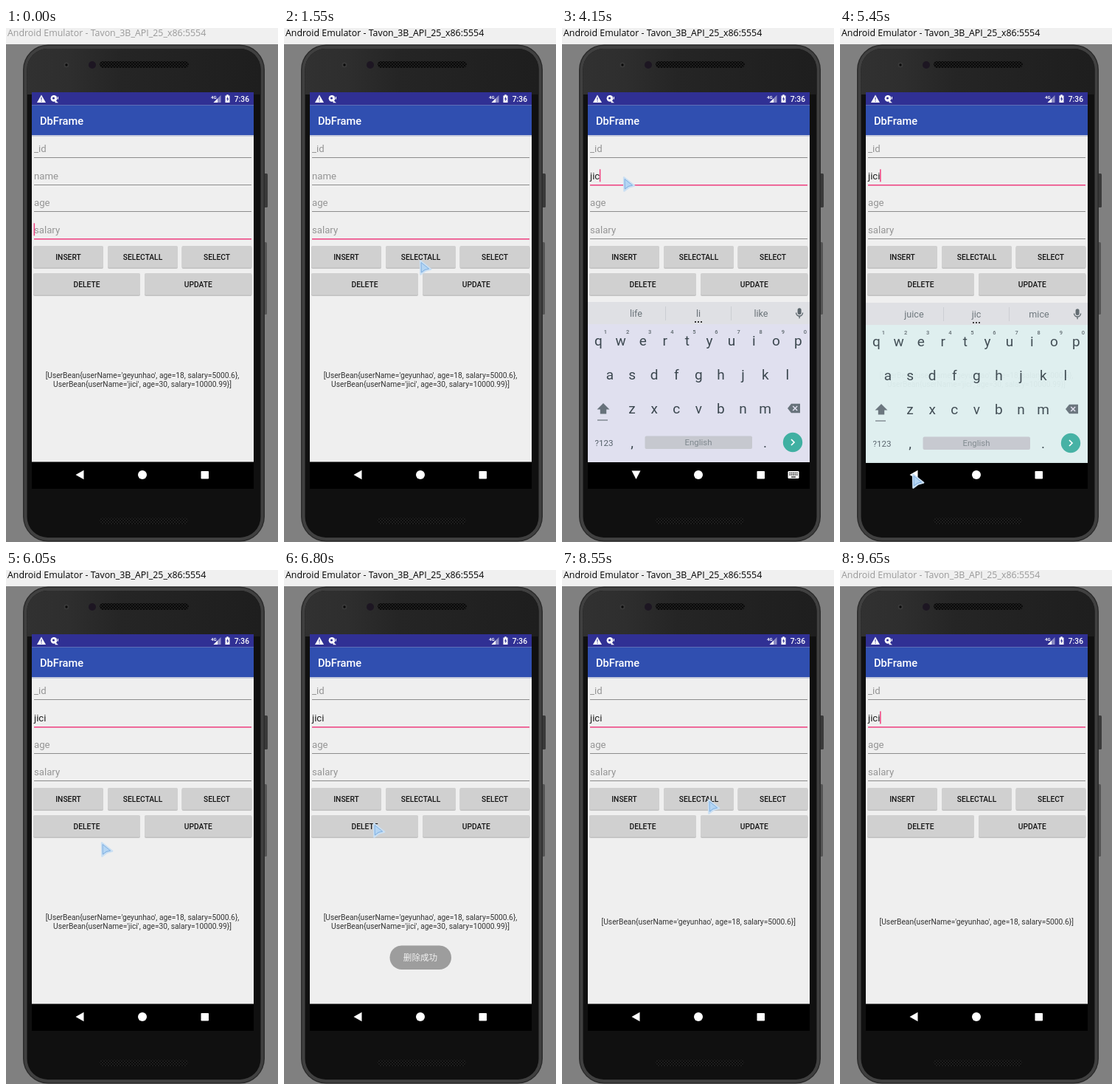
Write an HTML page that moves like this. It is 369 by 696 pixels and loops after 10 s.

```html
<!DOCTYPE html>
<html lang="en">
<head>
<meta charset="utf-8">
<title>Database demo</title>
<style>
html, body { margin: 0; width: 100%; height: 100%; overflow: hidden; background: #808080; }
svg { display: block; width: 369px; height: 696px; font-family: Roboto, sans-serif; }
.mid { text-anchor: middle; }
.cap { font-size: 10.25px; font-weight: 500; fill: #151515; text-anchor: middle; }
.field { font-size: 13.2px; }
.out { font-size: 10.25px; fill: #333; text-anchor: middle; }
.key { font-size: 19px; fill: #3b474f; text-anchor: middle; }
.hint { font-size: 7.5px; font-weight: 500; fill: #5c666c; text-anchor: middle; }
.word { font-size: 12.6px; fill: #6a7379; text-anchor: middle; }
</style>
</head>
<body>
<svg id="stage" viewBox="0 0 369 696" xmlns="http://www.w3.org/2000/svg">
  <defs>
    <pattern id="mesh" width="4" height="4" patternUnits="userSpaceOnUse">
      <rect width="4" height="4" fill="#0a0a0a"/>
      <circle cx="1" cy="1" r=".8" fill="#343434"/><circle cx="3" cy="3" r=".8" fill="#343434"/>
    </pattern>
    <linearGradient id="glare" x2="1" y2="0">
      <stop offset="0" stop-color="#313131"/><stop offset=".18" stop-color="#2e2e2e"/>
      <stop offset=".4" stop-color="#252525"/><stop offset="1" stop-color="#1e1e1e"/>
    </linearGradient>
    <clipPath id="screen"><rect x="35" y="87" width="301" height="537"/></clipPath>
  </defs>

  <rect width="369" height="696" fill="#808080"/>
  <rect width="369" height="22" fill="#f0f0f0"/>
  <text id="caption" x="2" y="11" font-size="12.4" font-family="Open Sans, sans-serif">Android Emulator - Tavon_3B_API_25_x86:5554</text>

  <g id="phone">
    <rect x="349" y="197" width="6" height="46" rx="1.5" fill="#3a3a3a"/>
    <rect x="349" y="290" width="5" height="98" rx="1.5" fill="#555"/>
    <rect x="23" y="22.5" width="328" height="673" rx="34" fill="#2b2b2b"/>
    <rect x="24.5" y="24" width="325" height="670" rx="32.5" fill="#404040"/>
    <rect x="28.5" y="28" width="317" height="662" rx="28" fill="#101010"/>
    <path d="M28.5 90V56a28 28 0 0 1 28-28h261a28 28 0 0 1 28 28v34z" fill="url(#glare)"/>
    <circle cx="82" cy="50" r="3.5" fill="#3a3a3a"/><circle cx="82" cy="50" r="1.7" fill="#0a0a0a"/>
    <circle cx="117" cy="50" r="5" fill="#1d1622"/>
    <rect x="127" y="45" width="121" height="9" rx="4.5" fill="url(#mesh)"/>
    <rect x="127" y="663" width="120" height="9" rx="4.5" fill="url(#mesh)"/>
  </g>

  <rect x="35" y="87" width="301" height="501" fill="#efefef"/>
  <rect x="35" y="145" width="301" height="2" fill="#c6cbdc"/>
  <rect x="35" y="87" width="301" height="17.5" fill="#303094"/>
  <rect x="35" y="104.5" width="301" height="40.5" fill="#304fb0"/>
  <g id="status" fill="#fff">
    <path d="M48 90.5l6 10.5h-12z"/><path d="M47.5 94h1v3.5h-1zM47.5 98.5h1v1.2h-1z" fill="#303094"/>
    <circle cx="65" cy="95.3" r="4.4"/><path d="M67 98l4 3.2h-4.5zM70 93h1v3.5H70z"/>
    <circle cx="64.5" cy="95" r="1.6" fill="#303094"/>
    <text x="278" y="95.5" font-size="6" font-weight="700">4G</text>
    <path d="M291.5 91v10h-10z" opacity=".45"/><path d="M287 95.5v5.5h-5.5z"/>
    <path d="M297.5 91.5h1.8v-1.2h2.4v1.2h1.8v9.5h-6z"/>
    <path d="M301 92.8l-2 3.6h1.3v3l2-3.8h-1.3z" fill="#303094"/>
    <text x="330" y="99.7" font-size="10.25" font-weight="500" text-anchor="end">7:36</text>
  </g>
  <text x="46" y="130.7" font-size="14.65" font-weight="500" fill="#fff">DbFrame</text>

  <g id="form"></g>
  <rect id="caret" width="1.5" height="17" fill="#f0407f"/>
  <g id="result"></g>
  <rect x="35" y="587.5" width="301" height="36.5"/>
  <g clip-path="url(#screen)"><g id="board"></g></g>

  <g fill="#fff">
    <path id="back"/>
    <circle cx="185" cy="605" r="6"/>
    <rect x="264.5" y="600" width="10.5" height="10.5" rx=".8"/>
    <g id="ime">
      <rect x="306.5" y="600" width="15" height="10" rx="1.2"/>
      <path d="M308.5 602.5h11M308.5 605h11" stroke="#000" stroke-width="1.3" stroke-dasharray="1.4 1"/>
      <path d="M311 608h6" stroke="#000" stroke-width="1.2"/>
    </g>
  </g>

  <g id="toast">
    <rect x="143.5" y="508.5" width="83.5" height="32.5" rx="16.2" fill="#616161"/>
    <text class="mid" x="185" y="529" font-size="11.6" fill="#f2f2f2" font-family="Noto Sans CJK SC, Noto Sans CJK, sans-serif">删除成功</text>
  </g>

  <g id="mouse" stroke-linejoin="round">
    <path d="M2 1.5L16.2 12.6L9 14.6L2.4 19.6Z" fill="#93bfea" stroke="#c9dff3" stroke-width="2.4"/>
    <path d="M3 3.5L13.6 12L8 13.4L3.3 17Z" fill="#b4d5f3" stroke="#80b0e2"/>
  </g>
</svg>

<script>
const LOOP = 10000, STEP = 50;
const NAME = "jici";
const $ = id => document.getElementById(id);
const within = (t, a, b) => t >= a && t < b;
const ramp = (t, a, b) => Math.min(1, Math.max(0, (t - a) / (b - a)));
const show = (el, on) => el.setAttribute("visibility", on ? "visible" : "hidden");
const text = (x, y, s, attrs) => `<text x="${x}" y="${y}" ${attrs}>${s}</text>`;

// Form
const rows = ["_id", "name", "age", "salary"];
const buttons = [
  ["INSERT", 37, 295, 95], ["SELECTALL", 138, 295, 95], ["SELECT", 238.5, 295, 95],
  ["DELETE", 37, 332, 145], ["UPDATE", 188, 332, 145.5]
];
$("form").innerHTML = rows.map((label, i) =>
  text(38, 168 + 36.6 * i, label, `id="${label}" class="field" fill="#959595"`) +
  `<rect id="line${i}" x="38" y="${Math.round(175.2 + 36.6 * i)}" width="295"/>`
).join("") + buttons.map(([label, x, y, w]) =>
  `<rect x="${x}" y="${y + 1}" width="${w}" height="30" rx="2" fill="#c2c2c2"/>
   <rect x="${x}" y="${y}" width="${w}" height="29.5" rx="1.8" fill="#d0d0d0"/>
   <rect id="press${label}" x="${x}" y="${y}" width="${w}" height="29.5" rx="1.8" fill="#000" opacity="0"/>` +
  text(x + w / 2, y + 19, label, 'class="cap"')
).join("");

// Query output
const bean = (name, age, salary) => `UserBean{userName='${name}', age=${age}, salary=${salary}}`;
const first = bean("geyunhao", 18, "5000.6");
$("result").innerHTML =
  "<g id='both'>" + text(185, 474, "[" + first + ",", 'class="out"') +
  text(185, 486.3, bean(NAME, 30, "10000.99") + "]", 'class="out"') + "</g>" +
  "<g id='one'>" + text(185.3, 480, "[" + first + "]", 'class="out"') + "</g>";

// Keyboard
const keys = (letters, x, y) => [...letters].map((c, i) => text(x + 30.1 * i, y, c, 'class="key"')).join("");
const digits = [..."1234567890"].map((c, i) => text(59 + 30.1 * i, 413.5, c, 'class="hint"')).join("");
$("board").innerHTML = `
  <rect x="35" y="371" width="301" height="217" fill="#e0e0ef"/>
  <rect id="tint" x="35" y="401" width="301" height="187" fill="#dff0f0"/>
  <rect x="35" y="371" width="301" height="30" fill="#dfe0e4"/>
  <path d="M140.5 377v19M229.5 377v19" stroke="#cbcdd2"/>
  <g id="words">${[100.5, 185, 270].map((x, i) => text(x, 391.3, "", `id="word${i}" class="word"`)).join("")}
    <path d="M180 398h2M184 398h2M188 398h2" stroke="#333" stroke-width="2"/></g>
  <g fill="none" stroke="#5c666c" stroke-width="1.4">
    <rect x="320.3" y="380" width="3.6" height="7.4" rx="1.8" fill="#5c666c"/>
    <path d="M317.6 385.5a4.5 4.5 0 0 0 9 0M322.1 390v3.2"/>
  </g>
  ${digits}${keys("qwertyuiop", 49.5, 430)}${keys("asdfghjkl", 65, 475.5)}${keys("zxcvbnm", 95, 521.5)}
  <path d="M56 508l8.5 8.5h-4.3v6h-8.4v-6h-4.3z" fill="#67727b"/>
  <path d="M48 531h14" stroke="#7b858c" stroke-width="1.4"/>
  <path d="M306 515l5-6.3h12v12.6h-12z" fill="#67727b"/>
  <path d="M313.2 512l6 6M319.2 512l-6 6" stroke="#e0e0ef" stroke-width="1.5"/>
  ${text(57, 565.5, "?123", 'class="mid" font-size="11.6" fill="#56616a"')}
  ${text(95, 568, ",", 'class="key"')}${text(275.5, 568, ".", 'class="key"')}
  <rect x="112.5" y="552.5" width="145.5" height="17.5" rx="2" fill="#c6c8cf"/>
  ${text(185, 565.3, "English", 'class="mid" font-size="11.4" fill="#7f888e"')}
  <circle cx="313" cy="561" r="13.2" fill="#40b0a2"/>
  <path d="M311 557l4 4l-4 4" fill="none" stroke="#fff" stroke-width="1.7"/>`;

// Pointer stops: time, x, y
const stops = [
  [50, 15, 376], [200, 15, 376], [700, 183, 314], [1550, 183, 314], [1650, 189, 309],
  [1800, 189, 309], [2250, 82, 201], [4700, 82, 201], [5300, 97, 603], [5500, 97, 603],
  [5750, 122, 413], [6050, 128, 368], [6350, 120, 342], [6900, 120, 342], [7650, 197, 310],
  [8800, 197, 310], [9250, 18, 300]
];
function pointerAt(t) {
  let i = 0;
  while (i < stops.length - 2 && t >= stops[i + 1][0]) i++;
  const [a, x, y] = stops[i], [b, u, v] = stops[i + 1];
  const p = ramp(t, a, b), e = p * p * (3 - 2 * p);
  return [x + (u - x) * e, y + (v - y) * e];
}

const typedAt = [3700, 3950, 4150, 4300];
const caretOff = [
  [650, 1100], [1550, 1950], [2900, 3300], [4750, 5150], [5550, 5750],
  [5950, 6350], [6650, 7050], [7300, 7650], [8350, 8850]
];
const pulse = (t, a, b) => within(t, a, b) ? .1 * Math.sin(Math.PI * ramp(t, a - STEP, b)) : 0;

function drawForm(t) {
  const focus = t < 2200 ? 3 : 1;
  rows.forEach((_, i) => {
    const line = $("line" + i), on = i === focus;
    line.setAttribute("height", on ? 1.5 : 1);
    line.setAttribute("fill", on ? "#ee3f7f" : "#8c8c8c");
  });
  const typed = NAME.slice(0, typedAt.filter(k => t >= k).length);
  const field = $("name");
  field.textContent = typed || "name";
  field.setAttribute("fill", typed ? "#222" : "#959595");
  $("caret").setAttribute("x", 37.6 + (typed ? field.getComputedTextLength() : 0));
  $("caret").setAttribute("y", focus === 3 ? 264.3 : 191.3);
  show($("caret"), !caretOff.some(([a, b]) => within(t, a, b)));
  $("pressSELECTALL").setAttribute("opacity", pulse(t, 1100, 1200) + pulse(t, 8050, 8350));
  $("pressDELETE").setAttribute("opacity", pulse(t, 6500, 6800));
}

function drawBoard(t) {
  const up = within(t, 2400, 5700);
  const rest = t < 4000 ? Math.pow(1 - ramp(t, 2400, 2750), 3) : Math.pow(ramp(t, 5400, 5700), 2);
  show($("board"), up);
  $("board").setAttribute("transform", `translate(0 ${Math.round(40 * rest)})`);
  $("board").setAttribute("opacity", Math.max(0, 1 - 1.6 * rest));
  $("tint").setAttribute("opacity", rest > 0 ? 1 : 0);
  const words = t < 3750 ? ["", "", ""] : t < 4200 ? ["life", "li", "like"] : ["juice", "jic", "mice"];
  words.forEach((w, i) => $("word" + i).textContent = w);
  $("words").setAttribute("opacity", t < 3750 ? 0 : 1);
  const open = within(t, 2400, 5450);
  $("back").setAttribute("d", open ? "M94.5 599.5h12l-6 11.5z" : "M94.5 605l11-6.3v12.6z");
  $("ime").setAttribute("opacity", open ? 1 : 0);
}

function draw(t) {
  $("caption").setAttribute("fill", within(t, 850, 9650) ? "#000" : "#999");
  drawForm(t);
  drawBoard(t);
  const covered = within(t, 2750, 5400);
  $("both").setAttribute("opacity", t < 8050 && !covered ? 1 : 0);
  $("one").setAttribute("opacity", t >= 8050 ? 1 : 0);
  $("toast").setAttribute("opacity", ramp(t, 6600, 6950) - ramp(t, 8200, 8550));
  const [x, y] = pointerAt(t);
  $("mouse").setAttribute("transform", `translate(${x} ${y})`);
  show($("mouse"), within(t, 50, 9250));
}

const start = performance.now();
function tick() {
  const t = (performance.now() - start) % LOOP;
  draw(Math.floor(t / STEP) * STEP);
  requestAnimationFrame(tick);
}
tick();
</script>
</body>
</html>
```
